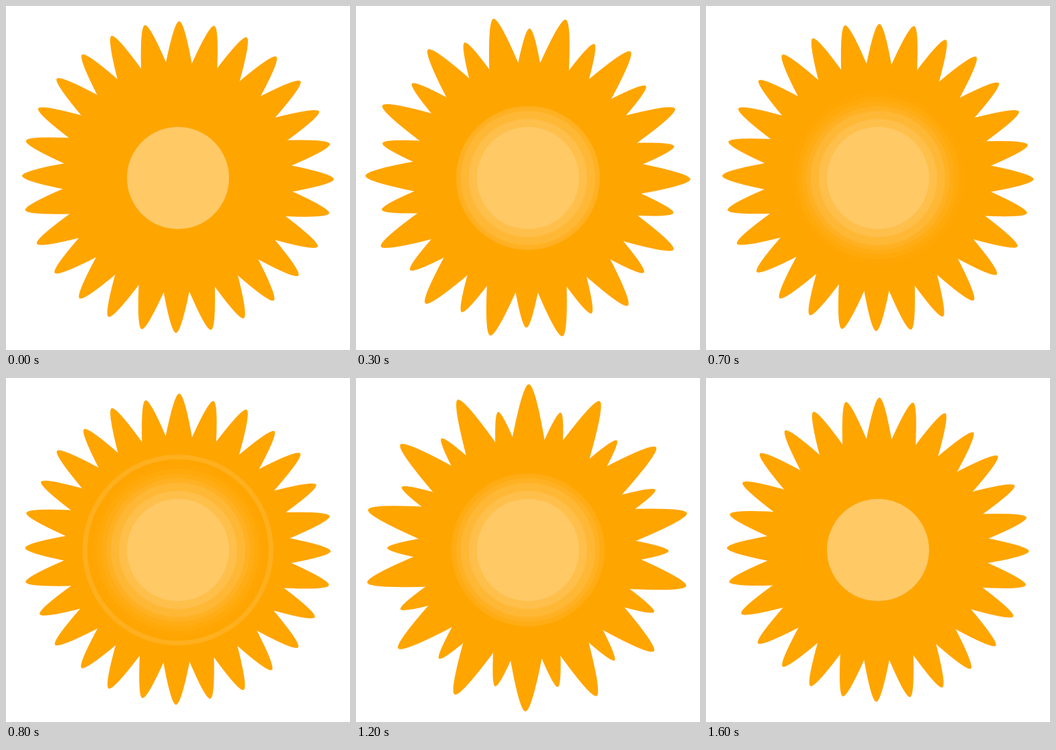
An HTML page with a canvas for the animation above (1700 ms loop, 512 px wide and 512 px high).

```html
<!DOCTYPE html>
<html lang="en">
<head>
<meta charset="utf-8">
<title>Sun</title>
<style>
html, body { margin: 0; width: 100%; height: 100%; overflow: hidden; background: #fff; }
canvas { display: block; width: 100vmin; height: 100vmin; }
</style>
</head>
<body>
<canvas id="stage" width="512" height="512"></canvas>
<script>
const ctx = document.getElementById('stage').getContext('2d');
const LOOP = 1700, STEP = 100;
const PETALS = 28, BASE = 150;
const TILT = 0.6 * Math.PI / 180;
const START = 232, REST = 225.5;

const lerp = (a, b, p) => a + (b - a) * p;

// Petal length: to the first extreme, across to the second, then easing to rest
function swing(step, first, second) {
  if (step < 4) return lerp(START, first, step / 4);
  if (step < 12) return lerp(first, second, (step - 4) / 8);
  return lerp(second, REST, Math.sin((step - 12) / 5 * Math.PI / 2));
}

function fillDisc(radius, white = 0) {
  ctx.fillStyle = `rgb(255,${Math.round(165 + 90 * white)},${Math.round(255 * white)})`;
  ctx.beginPath();
  ctx.arc(256, 256, radius, 0, 2 * Math.PI);
  ctx.fill();
}

function fillPetal(x, y, angle, length) {
  const half = 23 + 0.28 * (length - 232);
  const shoulder = 0.36 * half;
  ctx.save();
  ctx.translate(x, y);
  ctx.rotate(angle);
  ctx.beginPath();
  ctx.moveTo(0, 0);
  ctx.lineTo(-half, -BASE);
  ctx.quadraticCurveTo(-shoulder, -length, 0, -length);
  ctx.quadraticCurveTo(shoulder, -length, half, -BASE);
  ctx.fill();
  ctx.restore();
}

function drawPetals(step) {
  const even = swing(step, 219.5, 243.5);
  const odd = swing(step, 245, 209.5);
  // The even set drifts up and left slightly as it grows
  const drift = even - 222;
  fillDisc(160);
  for (let i = 0; i < PETALS; i++) {
    const angle = i * 2 * Math.PI / PETALS + TILT;
    if (i % 2) fillPetal(255.9, 255.3, angle, odd);
    else fillPetal(256 - 0.06 * drift, 256.2 - 0.158 * drift, angle, even);
  }
}

function drawGlow(step) {
  const outer = 8 - Math.abs(8 - step);
  for (let i = outer; i >= 0; i--) {
    const radius = 76 + 7 * i + 5 * Math.min(i, 2);
    const white = i === 8 ? 0.12 : 0.4 * (1 - i / 8) ** 2.3;
    fillDisc(radius, white);
  }
}

function frame() {
  const step = Math.floor(performance.now() % LOOP / STEP);
  ctx.fillStyle = '#fff';
  ctx.fillRect(0, 0, 512, 512);
  drawPetals(step);
  drawGlow(step);
  requestAnimationFrame(frame);
}
frame();
</script>
</body>
</html>
```
